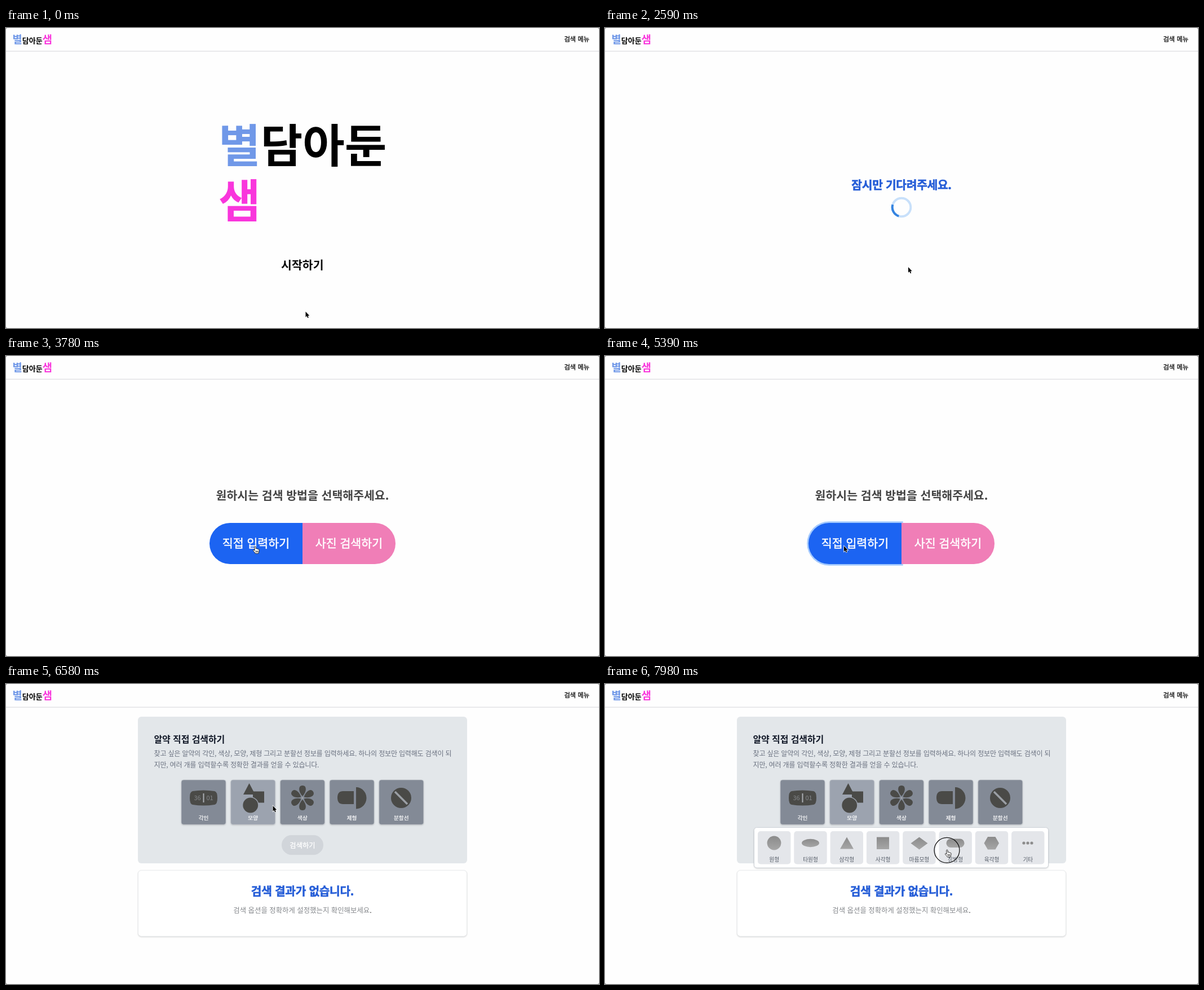
Write an HTML page that moves like this. It is 1052 by 532 pixels and loops after 8 s.

```html
<!DOCTYPE html>
<html lang="ko">
<head>
<meta charset="utf-8">
<title>별담아둔샘</title>
<style>
  html, body { margin: 0; width: 100%; height: 100%; overflow: hidden; background: #999; }
  svg { display: block; width: 1052px; height: 532px; background: #fefefe; border-radius: 3px; }
  text { font-family: "Noto Sans CJK KR", "Noto Sans KR", "Noto Sans CJK", sans-serif; white-space: pre; }
  .low { filter: drop-shadow(0 1px 1px rgba(0, 0, 0, .16)); }
  .blue { fill: #7098e8; }
  .pink { fill: #f936dc; }
</style>
</head>
<body>
<svg id="stage" viewBox="0 0 1052 532">
  <defs>
    <linearGradient id="grey" x2="0" y2="1">
      <stop stop-color="#8b8b8b"/><stop offset="1" stop-color="#a6a6a6"/>
    </linearGradient>
  </defs>
</svg>
<script>
const stage = document.getElementById('stage');

// Weights 500 and 800 are a thin outline on the regular and bold cuts
const text = (x, y, size, weight, fill, str, anchor = 'middle', gap = 0) => {
  const outline = weight === 500 || weight === 800 ? `stroke="${fill}" stroke-width="${size * .025}"` : '';
  const cut = { 500: 400, 800: 700 }[weight] || weight;
  return `<text x="${x}" y="${y}" font-size="${size}" font-weight="${cut}" fill="${fill}" text-anchor="${anchor}" letter-spacing="${gap}" ${outline}>${str}</text>`;
};
const box = (x, y, w, h, r, fill, more = '') =>
  `<rect x="${x}" y="${y}" width="${w}" height="${h}" rx="${r}" fill="${fill}" ${more}/>`;
const path = (d, more = '') => `<path d="${d}" ${more}/>`;
const circle = (x, y, r, more = '') => `<circle cx="${x}" cy="${y}" r="${r}" ${more}/>`;
const group = (id, body, more = '') => `<g id="${id}" ${more}>${body}</g>`;

// Site name: coloured first and last syllable around three plain ones
const brand = (x, y, big, small, wrap) => {
  const a = .922 * big, b = .922 * small * 3;
  const [lx, ly] = wrap ? [x, y + wrap] : [x + a + b, y];
  return `<g font-weight="700"><text class="blue" x="${x}" y="${y}" font-size="${big}">별</text>
    <text x="${x + a}" y="${y}" font-size="${small}">담아둔</text>
    <text class="pink" x="${lx}" y="${ly}" font-size="${big}">샘</text></g>`;
};

const header = box(0, 40.5, 1052, 1.5, 0, '#e3e4e6') + brand(11.5, 26.8, 18.7, 13) +
  text(1012.6, 24, 11.3, 500, '#111', '검색 메뉴');

const home = brand(377, 237.5, 81, 81, 98) + text(525.8, 428.2, 20.5, 700, '#0a0a0a', '시작하기');

const loading = text(526, 285.8, 20.4, 800, '#255dd7', '잠시만 기다려주세요.', 'middle', -.35) +
  circle(526, 318, 16.3, 'fill="none" stroke="#c8e0fa" stroke-width="4"') +
  path('M542.3 318A16.3 16.3 0 0 1 526 334.3', 'id="arc" fill="none" stroke="#3584e0" stroke-width="4"');

const leftHalf = (g) => `M526 ${296 - g}H397.5A${36.5 + g} ${36.5 + g} 0 0 0 397.5 ${369 + g}H${526 + g}V${296 - g}Z`;
const choose = text(526, 255, 20.5, 700, '#444', '원하시는 검색 방법을 선택해주세요.') +
  path(leftHalf(2.7), 'id="focus" fill="#a4cafe"') +
  path('M397.5 296H526V369H397.5A36.5 36.5 0 0 1 397.5 296', 'fill="#1c64f2"') +
  path('M526 296H654.5A36.5 36.5 0 0 1 654.5 369H526Z', 'fill="#f07eb7"') +
  text(443.5, 340, 20.6, 500, '#fff', '직접 입력하기') + text(608.5, 340, 20.6, 500, '#fff', '사진 검색하기');

const petal = 'M0 -3C-7.6 -11 -8 -22 0 -22C8 -22 7.6 -11 0 -3Z';
const flower = Array.from({ length: 6 }, (_, i) =>
  path(petal, `transform="translate(526 202) rotate(${i * 60})"`)).join('');
const tileIcons = [
  path('M331 190Q350.5 187 370 190Q375 191 375 202Q375 213 370 214Q350.5 217 331 214Q326 213 326 202Q326 191 331 190Z') +
    box(349.5, 194, 2, 16, 0, '#a9adb3') +
    text(339.5, 206, 11, 400, '#85888c', '36') + text(361.5, 206, 11, 400, '#85888c', '01'),
  path('M431.5 176L442 196H421Z') + box(438, 190.5, 20, 20, 0, '#4a4a47') +
    circle(433.7, 215, 14.8, 'id="gap" fill="#838a96" stroke="none"') + circle(433.7, 215, 13.4),
  flower + circle(526, 202, 1.6, 'fill="#a5a7aa"'),
  path('M617 190H598Q588 190 588 201.5Q588 213 598 213H617Z') + path('M621 183A18.5 19.2 0 0 1 621 221.4Z'),
  circle(701, 202, 18) + path('M690 191L712 213', 'stroke="#9b9fa5" stroke-width="3.6"')
];
const tiles = ['각인', '모양', '색상', '제형', '분할선'].map((name, i) => {
  const x = 311 + i * 87.7;
  return box(x, 170, 79, 79.3, 4, '#838a96', `id="tile${i}" class="low" stroke="#c9ced4" stroke-width=".6"`) +
    `<g fill="#4a4a47">${tileIcons[i]}</g>` + text(x + 39.5, 240.8, 9.6, 500, '#fff', name);
}).join('');

const shapes = [
  circle(300, 282, 12.4),
  '<ellipse cx="364.5" cy="282" rx="15.5" ry="7.2"/>',
  path('M429 271.5L441 292.5H417Z'),
  box(482, 271.5, 22, 21.5, 0, 'url(#grey)'),
  path('M557.5 271.5L572.5 282.5L557.5 293.5L542.5 282.5Z'),
  box(605.5, 274.5, 32, 15.5, 7.7, 'url(#grey)'),
  path('M679 271H692.5L699 282.3L692.5 293.6H679L672.5 282.3Z'),
  [743, 750, 757].map(x => circle(x, 282, 2.6, 'fill="#8c8c8c"')).join('')
];
const kinds = ['원형', '타원형', '삼각형', '사각형', '마름모형', '장방형', '육각형', '기타'];
const menu = box(264.5, 254.5, 522, 71.5, 5, '#fff', 'class="low" stroke="#cfd3d9"') +
  kinds.map((name, i) => {
    const x = 271 + i * 64.3;
    return box(x, 261, 58.4, 58.4, 5, '#e4e6ea') + text(x + 29.2, 315.3, 9.7, 400, '#565d68', name);
  }).join('') + group('shapes', shapes.join(''), 'fill="url(#grey)"');

const search = box(234, 58, 584, 260, 6, '#e3e7ea') +
  text(262.5, 104.2, 16, 700, '#111827', '알약 직접 검색하기', 'start', -.1) +
  text(262.5, 127.8, 12.1, 400, '#6b7280', '찾고 싶은 알약의 각인, 색상, 모양, 제형 그리고 분할선 정보를 입력하세요. 하나의 정보만 입력해도 검색이 되', 'start', -.24) +
  text(262.5, 148.2, 12.1, 400, '#6b7280', '지만, 여러 개를 입력할수록 정확한 결과를 얻을 수 있습니다.', 'start', -.24) +
  tiles + box(489, 268, 74, 35, 17.5, '#d1d5da') + text(526, 290.5, 12.3, 500, '#fff', '검색하기') +
  box(234.4, 330.4, 583.2, 117, 6, '#fff', 'class="low" stroke="#e4e6e9" stroke-width=".8"') +
  text(526, 374.8, 20.3, 800, '#255dd7', '검색 결과가 없습니다.', 'middle', -.3) +
  text(526, 406.2, 12.4, 300, '#85888c', '검색 옵션을 정확하게 설정했는지 확인해보세요<tspan fill="#333">.</tspan>') +
  group('menu', menu);

const arrow = path('M0 0V9.8L2.2 7.8L3.7 11.2L5.3 10.5L3.9 7.2H6.8Z', 'id="arrow" stroke="#fff" stroke-width="1.4" paint-order="stroke"');
const hand = path('M-1.3 1.2C-1.3 -.3 .9 -.3 1 1.2L1.2 4.4C1.8 3.7 3.1 4 3.2 4.9C3.9 4.3 5.1 4.6 5.2 5.6C6.1 5.1 7 5.6 7 6.6C7.1 9 6.5 10 5.9 12.8H.3C-.8 10.7 -2 9.6 -3.3 8.1C-4 6.9 -2.8 6 -1.8 6.8L-.8 7.8Z' +
  'M1.3 8V10.8M3 8V10.8M4.7 8V10.8', 'id="hand" fill="#fff" stroke="#111" stroke-width=".9" stroke-linejoin="round"');
const pointer = circle(-.5, .8, 22.4, 'id="ring" fill="none" stroke="#111" stroke-width="1.3"') + arrow + hand;

stage.insertAdjacentHTML('beforeend', header + group('home', home) + group('loading', loading) +
  group('choose', choose) + group('search', search) + group('pointer', pointer));

const el = {};
stage.querySelectorAll('[id]').forEach(n => el[n.id] = n);

const LOOP = 8000, STEP = 70;
// Pointer moves: first step, last step, target
const moves = [
  [70, 210, 538, 438], [350, 560, 538, 424],
  [3290, 3640, 478, 338], [3710, 3850, 424, 337],
  [6090, 6440, 473.5, 216],
  [7000, 7350, 582, 298], [7490, 7770, 607, 294]
];
// Click rings: start, end, radius
const clicks = [
  [910, 980, 17], [1400, 1470, 17], [1470, 1610, 22.8], [3990, 4130, 22.8],
  [5040, 5110, 22.8], [6440, 6580, 22.8], [7910, 7980, 17], [7980, LOOP, 22.4]
];
const spins = [[1960, -40], [2100, -10], [2170, 20], [2240, 50], [2310, 78], [2520, 92], [2590, 107]];

const show = (id, on) => el[id].style.display = on ? '' : 'none';

function place(t) {
  let x = 531.5, y = 503;
  for (const [a, b, tx, ty] of moves) {
    if (t < a) break;
    const u = Math.min(1, (t - a + STEP) / (b - a + STEP));
    x += (tx - x) * u;
    y += (ty - y) * u;
  }
  return [x, y];
}

function draw(now) {
  const t = Math.floor(now % LOOP / STEP) * STEP;
  const within = (a, b) => t >= a && t < b;

  show('home', t < 1960);
  show('loading', within(1960, 2800));
  show('choose', within(2800, 5460));
  show('search', t >= 5460);
  show('focus', t >= 3990);
  show('menu', t >= 6650);
  show('shapes', t >= 6790);

  const spin = spins.filter(s => s[0] <= t).pop();
  if (spin) el.arc.setAttribute('transform', `rotate(${spin[1]} 526 318)`);

  const [x, y] = place(t);
  el.pointer.setAttribute('transform', `translate(${x} ${y})`);
  const isHand = within(910, 2100) || within(3500, 5390) || t >= 7350;
  show('hand', isHand);
  show('arrow', !isHand);

  const hover = t >= 6090 && (y < 249 || t >= 6650) ? '#9ca3af' : '#838a96';
  el.tile1.setAttribute('fill', hover);
  el.gap.setAttribute('fill', hover);

  const click = clicks.find(c => within(c[0], c[1]));
  show('ring', click);
  if (click) el.ring.setAttribute('r', click[2]);
}

const start = performance.now();
(function tick() {
  draw(performance.now() - start);
  requestAnimationFrame(tick);
})();
</script>
</body>
</html>
```
